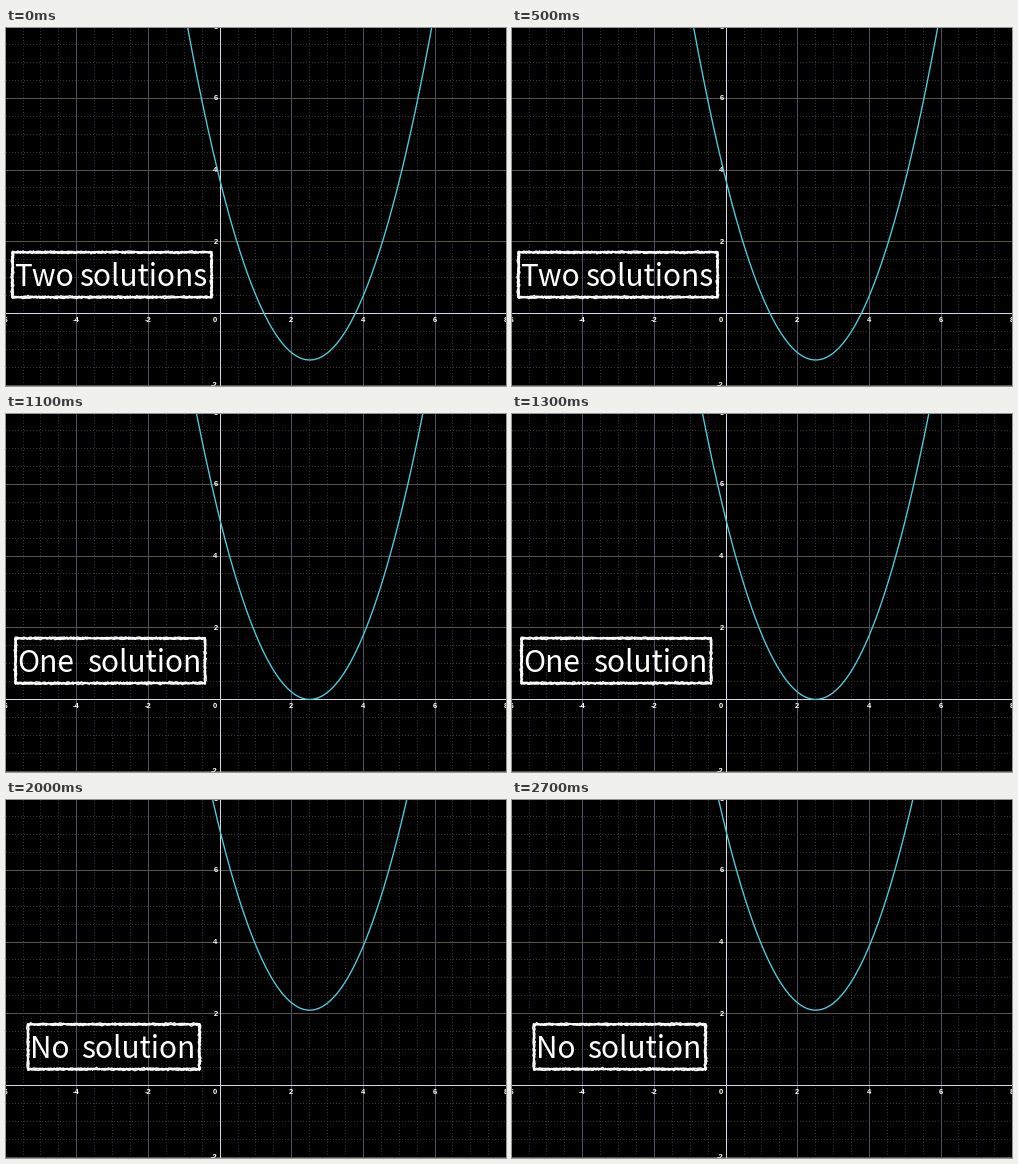
Write a matplotlib script that moves like this. It is 500 by 358 pixels and loops after 3000 ms.

```python
import numpy as np
import matplotlib.pyplot as plt
from matplotlib.animation import FuncAnimation

W, H, DPI = 500, 358, 100
PX = 72 / DPI                  # points per pixel
X0, Y0, UNIT = 214.1, 285.4, 35.83
FRAMES, STEP = 30, 100

# label, vertex height, box left, box right
SCENES = [
    ("Two solutions", -1.3, 6.5, 205.5),
    ("One solution", 0.0, 9.5, 199.0),
    ("No solution", 2.1, 22.0, 193.5),
]
BOX_TOP, BOX_BOTTOM = 224.3, 269.2

fig = plt.figure(figsize=(W / DPI, H / DPI), dpi=DPI, facecolor="black")
ax = fig.add_axes([0, 0, 1, 1])
ax.set_xlim(0, W)
ax.set_ylim(H, 0)
ax.axis("off")


def to_px(x, y):
    return X0 + UNIT * x, Y0 - UNIT * y


def grid_line(value, vertical, color, z, dash="-"):
    px, py = to_px(value, value)
    pos = np.floor(px if vertical else py) + 0.5
    xs, ys = ([pos, pos], [0, H]) if vertical else ([0, W], [pos, pos])
    # Lines already sit on pixel centres, so snapping would shift them.
    ax.plot(xs, ys, color=color, lw=PX, ls=dash, zorder=z, snap=False,
            dash_capstyle="butt", solid_capstyle="butt")


def draw_grid():
    dots = (0, (1, 2))
    for vertical, low, high in ((True, -6, 8), (False, -2, 8)):
        minor = "#2e2e50" if vertical else "#383822"
        major = "#505066" if vertical else "#565648"
        for v in np.arange(low, high + 0.1, 0.5):
            if v == 0:
                grid_line(v, vertical, "#d6d6ea", 3)
            elif v % 2 == 0:
                grid_line(v, vertical, major, 2)
            else:
                grid_line(v, vertical, minor, 1, dots)


def draw_ticks():
    style = dict(color="white", family="Liberation Sans", weight="bold",
                 fontsize=7.6 * PX, va="center", zorder=5)
    for x in range(-6, 9, 2):
        px = to_px(x, 0)[0] - (5 if x == 0 else 0.5)
        ax.text(px, 292, str(x), ha="center", **style)
    for y in (-2, 2, 4, 6, 8):
        ax.text(211.6, to_px(0, y)[1] + 0.4, str(y), ha="right", **style)


def chalk_box(left, right, rng):
    """Rectangle outline built from overlapping shaky strokes."""
    corners = [(left, BOX_TOP), (right, BOX_TOP),
               (right, BOX_BOTTOM), (left, BOX_BOTTOM)]
    parts = []
    for i, (xa, ya) in enumerate(corners):
        xb, yb = corners[(i + 1) % 4]
        n = int(np.hypot(xb - xa, yb - ya) / 1.3)
        for offset in (-0.7, 0, 0.7):
            shake = rng.normal(offset, 0.35, n)
            xs, ys = np.linspace(xa, xb, n), np.linspace(ya, yb, n)
            if ya == yb:
                ys = ys + shake
            else:
                xs = xs + shake
            parts += ax.plot(xs, ys, color="white", lw=1.4 * PX, zorder=6)
    return parts


def build_scene(index, label, height, left, right):
    rng = np.random.default_rng(index + 4)
    x = np.linspace(-1.5, 6.5, 400)
    parts = ax.plot(*to_px(x, 0.8 * (x - 2.5) ** 2 + height),
                    color="#50cddd", lw=1.35 * PX, zorder=4)
    parts += chalk_box(left, right, rng)
    style = dict(color="white", family="Noto Sans CJK JP",
                 fontsize=29.8 * PX, va="baseline", zorder=7)
    first, second = label.split()
    parts.append(ax.text(left + 2, 258, first, ha="left", **style))
    parts.append(ax.text(right - 4, 258, second, ha="right", **style))
    return parts


draw_grid()
draw_ticks()
scenes = [build_scene(i, *scene) for i, scene in enumerate(SCENES)]


def update(frame):
    current = frame * len(scenes) // FRAMES
    for i, parts in enumerate(scenes):
        for part in parts:
            part.set_visible(i == current)
    return []


anim = FuncAnimation(fig, update, frames=FRAMES, interval=STEP,
                     init_func=lambda: update(0), repeat=True, repeat_delay=0)
plt.show()
```
